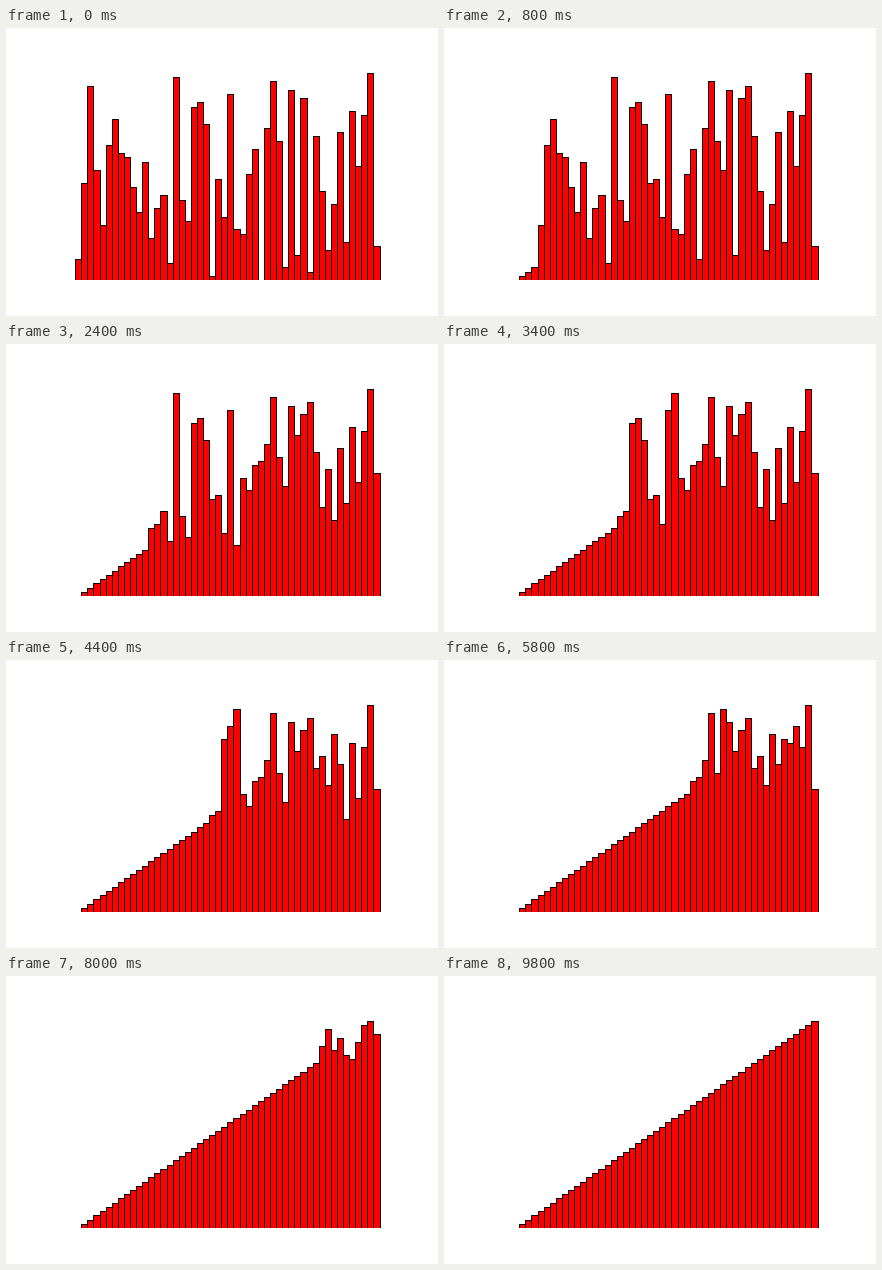
A matplotlib script that plays this animation: 432x288 px, repeating every 10 s.

```python
import matplotlib.pyplot as plt
from matplotlib.animation import FuncAnimation

START = [5, 23, 46, 26, 13, 32, 38, 30, 29, 22,
         16, 28, 10, 17, 20, 4, 48, 19, 14, 41,
         42, 37, 1, 24, 15, 44, 12, 11, 25, 31,
         0, 36, 47, 33, 3, 45, 6, 43, 2, 34,
         21, 7, 18, 35, 9, 40, 27, 39, 49, 8]
N = len(START)


def selection_sort(values):
    """Return the list before sorting and after each selection step."""
    values = list(values)
    states = [values[:]]
    for i in range(len(values) - 1):
        low = values.index(min(values[i:]), i)
        values[i], values[low] = values[low], values[i]
        states.append(values[:])
    return states


states = selection_sort(START)

fig = plt.figure(figsize=(6, 4), dpi=72, facecolor="white")
fig.subplots_adjust(left=0.125, right=0.9, bottom=0.125, top=0.88)
ax = fig.add_subplot()
bars = ax.bar(range(N), START, width=1, color="red",
              edgecolor="black", linewidth=1)
margin = 0.05
ax.set_xlim(-0.5 - margin * N, N - 0.5 + margin * N)
ax.set_ylim(0, (N - 1) * (1 + margin))
ax.axis("off")


def draw(step):
    for bar, value in zip(bars, states[step]):
        bar.set_height(value)
    return bars.patches


anim = FuncAnimation(fig, draw, frames=N, interval=200,
                     repeat=True, repeat_delay=0)
plt.show()
```
